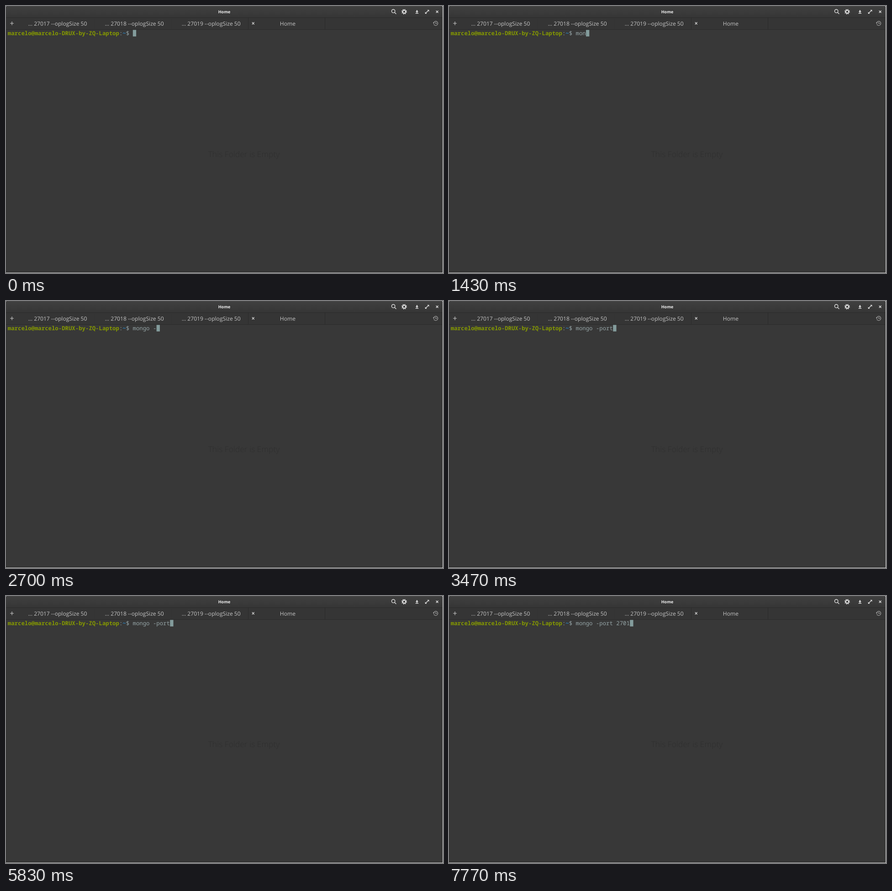
Write an HTML page that moves like this. It is 957 px wide and 585 px high and loops after 8000 ms.

```html
<!DOCTYPE html>
<html lang="en">
<head>
<meta charset="utf-8">
<title>Terminal</title>
<style>
  html, body { margin: 0; width: 100%; height: 100%; overflow: hidden; background: #d0d0d0; }
  svg { display: block; text-rendering: geometricPrecision; }
  .ui { font: 12.1px "Open Sans", sans-serif; fill: #c4c4c4; text-anchor: middle; }
  .title { font-size: 9px; font-weight: 700; fill: #f0f0f0; }
  .ghost { font-size: 17.5px; font-weight: 300; fill: #2f2f2f; }
  .term { font: 12.34px "Roboto Mono", "Noto Sans Mono", monospace; fill: #94a3a5; white-space: pre; }
  .term .user { font-weight: 700; fill: #859900; }
  .term .path { font-weight: 700; fill: #268bd2; }
  .icon { fill: none; stroke: #e2e2e2; stroke-width: 1.4; }
  .dim { stroke: #b0b0b0; stroke-width: 1.1; }
  .solid { fill: #e2e2e2; stroke: none; }
</style>
</head>
<body>
<svg width="957" height="585" viewBox="0 0 957 585">
  <defs>
    <linearGradient id="bar" x2="0" y2="1">
      <stop stop-color="#404040"/><stop offset="1" stop-color="#363636"/>
    </linearGradient>
  </defs>

  <!-- window -->
  <path d="M0 584V3Q0 0 3 0H953Q956 0 956 3V584Z" fill="#383838"/>
  <path d="M0 25V3Q0 0 3 0H953Q956 0 956 3V25Z" fill="url(#bar)"/>
  <rect y="26" width="956" height="25" fill="#353535"/>
  <path d="M0 25.5H956M0 51.5H956M530.5 26V51M698.5 26V51M0 583.5H956" stroke="#2a2a2a"/>
  <path d="M194.5 28V50M362.5 28V50" stroke="#323232"/>
  <path d="M.5 52V583M955.5 26V583" stroke="#313131"/>
  <path d="M3 .5H953" stroke="#4a4a4a"/>

  <!-- title bar icons -->
  <g class="icon">
    <circle cx="848.2" cy="11.2" r="3.7"/>
    <path d="M850.9 13.9L854.5 17.5"/>
    <circle cx="872" cy="12.5" r="3.2" stroke-width="2"/>
    <circle cx="872" cy="12.5" r="4.9" stroke-width="2" stroke-dasharray="1.9 1.95"/>
    <path class="solid" d="M899 9H901V11.6H903.2L900 15L896.8 11.6H899ZM896.8 15.3H903.2V16.7H896.8Z"/>
    <path d="M919.5 15.2L924.5 10.2"/>
    <path class="solid" d="M922.5 8.5H926.5V12.5ZM917.8 13V17H921.8Z"/>
    <path d="M941.8 10.3L946.6 15.1M946.6 10.3L941.8 15.1"/>
  </g>

  <!-- tab bar icons -->
  <g class="icon dim">
    <path d="M9 38H17M13 34V42" stroke="#cfcfcf"/>
    <path d="M538.9 35.6L543.7 40.4M543.7 35.6L538.9 40.4" stroke="#cfcfcf" stroke-width="1.4"/>
    <path d="M936.8 36A4.7 4.7 0 1 1 936.8 40M941.2 35V38.2H944"/>
    <path d="M934.8 36.2H938.8L936.6 39Z" fill="#b0b0b0" stroke="none"/>
  </g>

  <g class="ui">
    <text class="title" x="478" y="15.8">Home</text>
    <text x="113" y="42.6">… 27017 --oplogSize 50</text>
    <text x="281.1" y="42.6">… 27018 --oplogSize 50</text>
    <text x="449.2" y="42.6">… 27019 --oplogSize 50</text>
    <text x="617" y="42.6">Home</text>
    <text class="ghost" x="521" y="331">This Folder is Empty</text>
  </g>

  <text class="term" x="3.8" y="63.8"><tspan class="user">marcelo@marcelo-DRUX-by-ZQ-Laptop</tspan>:<tspan class="path">~</tspan>$ <tspan id="typed"></tspan></text>
  <rect id="cursor" y="52.4" width="7.3" height="14.3" fill="#839c9c"/>
</svg>
<script>
const LOOP = 8000, CELL = 7.404, START = 277.8;
const COMMAND = "mongo -port 2701";
const keyTimes = [1100, 1270, 1430, 1600, 1730, 2500, 2700, 3070,
                  3200, 3370, 3470, 5900, 6870, 7130, 7470, 7770];
const hidden = [[770, 1100], [2300, 2500], [4030, 4630], [5230, 5830], [6470, 6870]];
const typed = document.getElementById("typed");
const cursor = document.getElementById("cursor");

function draw() {
  const t = performance.now() % LOOP;
  const count = keyTimes.filter(k => k <= t).length;
  const blank = hidden.some(([from, to]) => t >= from && t < to);
  typed.textContent = COMMAND.slice(0, count);
  cursor.setAttribute("x", START + count * CELL);
  cursor.setAttribute("visibility", blank ? "hidden" : "visible");
  requestAnimationFrame(draw);
}
draw();
</script>
</body>
</html>
```
